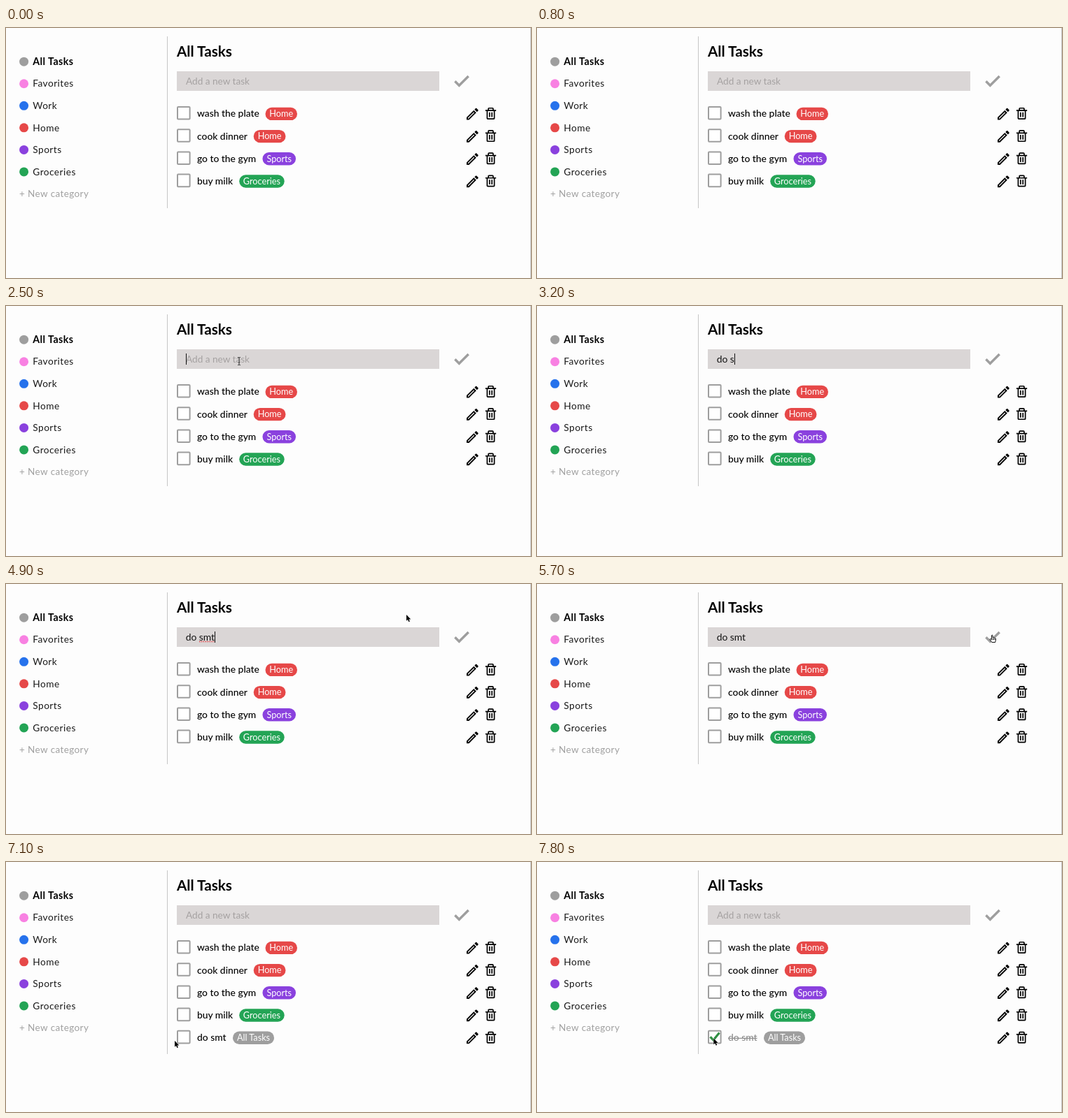
An HTML page for the animation above (8000 ms loop, 750 px wide and 358 px high).

```html
<!DOCTYPE html>
<html lang="en">
<head>
<meta charset="utf-8">
<title>Task list</title>
<style>
  html, body { margin: 0; width: 100%; height: 100%; overflow: hidden; background: #fdfdfd; }
  svg { display: block; width: 100%; height: 100%; }
  text { font-family: Lato, "Open Sans", sans-serif; font-size: 13.85px; font-weight: 500; fill: #000; white-space: pre; }
  .title { font-size: 20.7px; font-weight: 700; }
  .side { font-size: 13.7px; font-weight: 400; letter-spacing: .45px; fill: #1a1a1a; }
  .side.on { font-size: 14.2px; font-weight: 700; fill: #000; }
  .side.add { font-size: 13.5px; letter-spacing: .4px; fill: #a0a0a0; }
  .tag { font-size: 12.7px; font-weight: 400; fill: #fff; text-anchor: middle; }
  .typed { font-weight: 400; fill: #111; }
  .hint { font-size: 13.6px; font-weight: 400; fill: #a5a1a1; }
</style>
</head>
<body>
<svg id="stage" viewBox="0 0 750 358"></svg>
<script>
const LOOP = 8000, STEP = 100;
const GRAY = '#9e9e9e', RED = '#e64848', PURPLE = '#8a41de', GREEN = '#23a455';
const TICK = 'M9 16.17 4.83 12l-1.42 1.41L9 19 21 7l-1.41-1.41z';
const PENCIL = 'M14.06 9.02l.92.92L5.92 19H5v-.92l9.06-9.06M17.66 3c-.25 0-.51.1-.7.29l-1.83 1.83 3.75 3.75 1.83-1.83c.39-.39.39-1.02 0-1.41l-2.34-2.34c-.2-.2-.45-.29-.71-.29zm-3.6 3.19L3 17.25V21h3.75L17.81 9.94z';
const BIN = 'M5 20a2 2 0 0 0 2 2h10a2 2 0 0 0 2-2V8h2V6h-4V4a2 2 0 0 0-2-2H9a2 2 0 0 0-2 2v2H3v2h2zM9 4h6v2H9zM7 8h10v12H7zM9 10h2v8H9zm4 0h2v8h-2z';

const stage = document.getElementById('stage');

function el(name, attrs, parent = stage, content) {
  const node = document.createElementNS('http://www.w3.org/2000/svg', name);
  for (const key in attrs) node.setAttribute(key, attrs[key]);
  if (content !== undefined) node.textContent = content;
  parent.appendChild(node);
  return node;
}
const label = (x, y, str, cls = '', parent = stage) => el('text', { x, y, class: cls }, parent, str);
const rect = (x, y, width, height, fill, parent = stage) => el('rect', { x, y, width, height, fill }, parent);
const icon = (d, x, y, size, fill, parent = stage) =>
  el('path', { d, fill, 'fill-rule': 'evenodd', transform: `translate(${x} ${y}) scale(${size})` }, parent);
const show = (node, on) => node.setAttribute('visibility', on ? 'visible' : 'hidden');

// Sidebar
const categories = [
  ['All Tasks', GRAY], ['Favorites', '#f881e2'], ['Work', '#2672ec'],
  ['Home', RED], ['Sports', PURPLE], ['Groceries', GREEN]
];
categories.forEach(([name, fill], i) => {
  const y = 48.2 + i * 31.55;
  el('circle', { cx: 25.6, cy: y, r: 6.5, fill });
  label(38.3, y + 4.7, name, i ? 'side' : 'side on');
});
label(19, 242, '+ New category', 'side add');
const divider = rect(230, 12, 1, 246, '#c6c6c6');
rect(749, 0, 1, 358, '#c2c2c2');

// Header and input
label(244, 40.8, 'All Tasks', 'title');
rect(244, 62, 375, 28, '#dad6d6');
const hint = label(257, 80.6, 'Add a new task', 'hint');
const typed = label(256.7, 80.6, '', 'typed');
const caret = rect(257, 68, 1, 16, '#111');
const squiggle = el('path', {
  d: 'M276 82.6H298', stroke: '#e0484c', 'stroke-width': 1.5, 'stroke-dasharray': '1.5 1.2'
});
icon(TICK, 637.1, 62.2, 1.14, GRAY).setAttribute('stroke', GRAY);

// Task rows: name, tag, tag left, tag width, tag colour
const tasks = [
  ['wash the plate', 'Home', 370.5, 45.5, RED],
  ['cook dinner', 'Home', 353.7, 45.8, RED],
  ['go to the gym', 'Sports', 366.5, 47.5, PURPLE],
  ['buy milk', 'Groceries', 333.2, 64.5, GREEN],
  ['do smt', 'All Tasks', 324, 59, GRAY]
];
const rows = tasks.map(([name, tag, x, width, fill], i) => {
  const g = el('g', { transform: `translate(0 ${i * 32.2})` });
  el('rect', { x: 245, y: 113, width: 17.6, height: 17.6, rx: 1, fill: '#fff', stroke: GRAY, 'stroke-width': 2 }, g);
  const text = label(273, 127.4, name, '', g);
  el('rect', { x, y: 113.7, width, height: 18.4, rx: 9.2, fill }, g);
  label(x + width / 2, 127.2, tag, 'tag', g);
  icon(PENCIL, 655.2, 112, .93, '#000', g);
  icon(BIN, 682.3, 112.2, .85, '#000', g);
  return { g, text };
});
const newRow = rows[4];
const done = el('g', {}, newRow.g);
el('path', { d: 'M247.5 121.5L252 126.2 260.5 115.6', fill: 'none', stroke: '#2f8f43', 'stroke-width': 3.2 }, done);
rect(273, 123, 41.5, 1.2, '#8b8b8b', done);

// Pointers, each drawn around its hot spot
const arrow = el('path', {
  d: 'M0 0V8.8L2 7 3.4 10.2 4.9 9.5 3.5 6.4H6.3Z',
  fill: '#000', stroke: '#fff', 'stroke-width': .9, 'paint-order': 'stroke'
});
const beam = el('path', {
  d: 'M-2 -5.5H-1Q0 -5.5 0 -4.5 0 -5.5 1 -5.5H2M0 -4.5V4.5M-2 5.5H-1Q0 5.5 0 4.5 0 5.5 1 5.5H2M-1.2 2H1.2',
  fill: 'none', stroke: '#333', 'stroke-width': .9
});
const hand = el('path', {
  d: 'M-1.6 -4.4Q-.8 -5.6 0 -4.4V-1.2L2.8 -.7Q4.6 -.3 4.5 1.3L3.6 5.5H-1.2L-4 1.6Q-4 .2 -2.8 .7L-1.6 1.8ZM.2 .2V2M1.8 .4V2M3.2 .7V2',
  fill: '#fff', stroke: '#111', 'stroke-width': 1, 'stroke-linejoin': 'round'
});

// Pointer path: time, x, y
const path = [
  [1300, 339, 88], [1600, 333, 79], [4500, 333, 79], [4600, 348, 74], [4700, 440, 34],
  [4800, 548, 8], [4900, 572, 44], [5100, 598, 53], [5300, 628, 66], [5500, 649, 77],
  [5700, 651, 78], [6000, 649, 79], [6200, 592, 110], [6300, 530, 133], [6400, 460, 158],
  [6700, 333, 214], [6900, 272, 243], [7100, 241, 256], [7300, 247, 256], [7500, 252.3, 252.5]
];
function pointerAt(t) {
  const i = path.findIndex(p => p[0] > t);
  if (i < 0) return path[path.length - 1].slice(1);
  if (i === 0) return path[0].slice(1);
  const [a, b] = [path[i - 1], path[i]];
  const k = (t - a[0]) / (b[0] - a[0]);
  return [a[1] + (b[1] - a[1]) * k, a[2] + (b[2] - a[2]) * k];
}

const between = (t, from, to) => t >= from && t < to;
const keys = [[3000, 'd'], [3100, 'do'], [3200, 'do s'], [3300, 'do sm'], [3500, 'do smt']];

function draw(t) {
  const added = t >= 5900;
  let value = '';
  for (const [time, str] of keys) if (t >= time && !added) value = str;
  if (typed.textContent !== value) typed.textContent = value;
  show(hint, !value);

  const width = value ? typed.getComputedTextLength() : 0;
  caret.setAttribute('x', Math.round(257 + width));
  show(caret, between(t, 2200, 2700) || between(t, 3000, 4000) || between(t, 4500, 5000) || between(t, 5500, 5600));
  show(squiggle, between(t, 4500, 5600));

  newRow.g.setAttribute('display', added ? 'inline' : 'none');
  divider.setAttribute('height', added ? 263 : 246);
  const checked = t >= 7700;
  done.setAttribute('display', checked ? 'inline' : 'none');
  newRow.text.style.fill = checked ? '#8b8b8b' : '#000';

  const [x, y] = pointerAt(t);
  const visible = between(t, 1300, 3000) || t >= 4500;
  const overInput = between(x, 244, 619) && between(y, 62, 90);
  const overTick = between(x, 640, 662) && between(y, 66, 86);
  const current = overInput ? beam : overTick ? hand : arrow;
  for (const p of [arrow, beam, hand]) {
    show(p, visible && p === current);
    p.setAttribute('transform', `translate(${x} ${y})`);
  }
}

const start = performance.now();
function tick() {
  const t = (performance.now() - start) % LOOP;
  draw(Math.floor(t / STEP) * STEP);
  requestAnimationFrame(tick);
}
tick();
</script>
</body>
</html>
```
